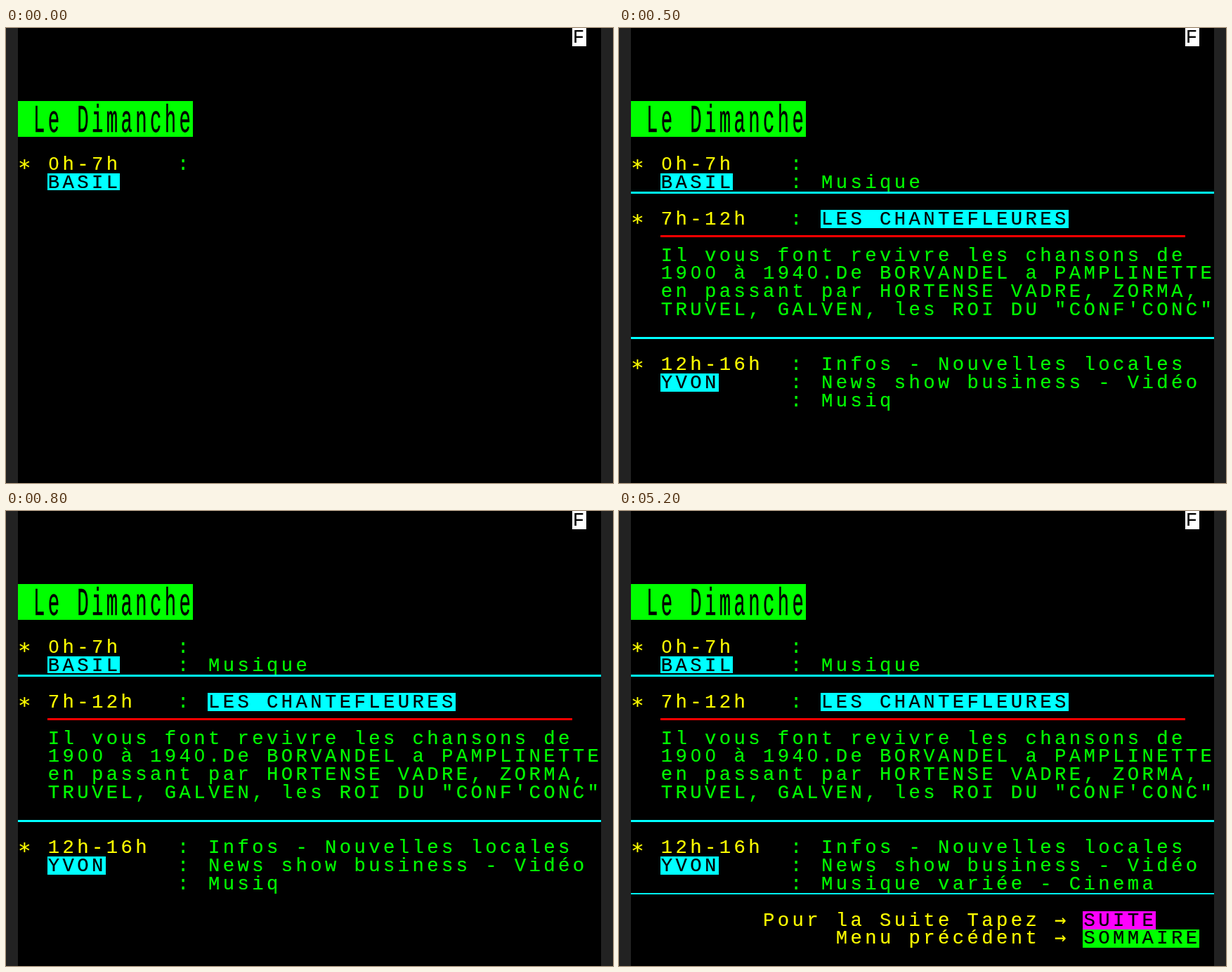
An HTML page that plays this animation: 864 px wide and 648 px high, repeating every 8000 ms.

```html
<!DOCTYPE html>
<html lang="fr">
<head>
<meta charset="utf-8">
<title>Le Dimanche</title>
<style>
  html, body { margin: 0; width: 100%; height: 100%; overflow: hidden; background: #000; }
  svg { display: block; width: 100%; height: 100%; }
  rect { shape-rendering: crispEdges; }
  text {
    font: 27.3px "Liberation Mono", "DejaVu Sans Mono", monospace;
    text-anchor: middle;
    white-space: pre;
    stroke-width: .2px;
  }
  .zero { font: 26px "Liberation Sans", Arial, sans-serif; }
  .star { font: 31px "DejaVu Sans Mono", monospace; baseline-shift: -7px; }
  .arrow { font: 27.3px "DejaVu Sans Mono", monospace; }
</style>
</head>
<body>
<svg id="screen" viewBox="0 0 864 648"></svg>
<script>
const LOOP = 8000;
const DOT = 2.59, CELL_W = 20.75, CELL_H = 10 * DOT, LEFT = 17;
const GREEN = '#0f0', YELLOW = '#ff0', CYAN = '#0ff', MAGENTA = '#f0f', RED = '#f00', WHITE = '#fff', BLACK = '#000';
const SIGNS = { '0': 'zero', '*': 'star', '→': 'arrow' };

const screen = document.getElementById('screen');
const colX = col => LEFT + col * CELL_W;
const rowY = row => row * CELL_H;

function add(parent, tag, attrs) {
  const el = document.createElementNS('http://www.w3.org/2000/svg', tag);
  for (const key in attrs) el.setAttribute(key, attrs[key]);
  parent.appendChild(el);
  return el;
}

// Edges snap to whole pixels.
function box(parent, left, top, width, height, fill) {
  const x = Math.round(left), y = Math.round(top);
  add(parent, 'rect', {
    x, y, fill,
    width: Math.round(left + width) - x,
    height: Math.round(top + height) - y
  });
}

// One glyph per cell; a few signs have their own style.
function write(parent, row, col, str, color, tall) {
  const nudge = str === ':' ? -3.5 : -1;
  const xs = [...str].map((_, i) => (colX(col + i + .5) + nudge).toFixed(2));
  const attrs = { x: xs.join(' '), fill: color, stroke: color };
  if (tall) {
    attrs.y = 0;
    attrs.transform = `translate(0 ${rowY(row) + 17 * DOT}) scale(1 2)`;
  } else {
    attrs.y = rowY(row) + 8 * DOT;
  }
  const text = add(parent, 'text', attrs);
  for (const part of str.split(/([0*→])/)) {
    if (SIGNS[part]) add(text, 'tspan', { class: SIGNS[part] }).textContent = part;
    else text.append(part);
  }
}

function label(parent, row, col, str, back, height = CELL_H) {
  box(parent, colX(col), rowY(row), str.length * CELL_W, height, back);
  write(parent, row, col, str, BLACK);
}

function rule(parent, row, color, from = 0, to = 40, drop = 0) {
  box(parent, colX(from), rowY(row) + drop, (to - from) * CELL_W, DOT, color);
}

function page1(g) {
  label(g, 0, 38, 'F', WHITE);
  box(g, colX(0), rowY(4), 12 * CELL_W, 2 * CELL_H, GREEN);
  write(g, 4, 1, 'Le Dimanche', BLACK, true);
  write(g, 7, 0, '*', YELLOW);
  write(g, 7, 2, '0h-7h', YELLOW);
  write(g, 7, 11, ':', GREEN);
  label(g, 8, 2, 'BASIL', CYAN, 9 * DOT);
}

function page2(g) {
  write(g, 8, 11, ':', GREEN);
  write(g, 8, 13, 'Musique', GREEN);
  rule(g, 9, CYAN);

  write(g, 10, 0, '*', YELLOW);
  write(g, 10, 2, '7h-12h', YELLOW);
  write(g, 10, 11, ':', GREEN);
  label(g, 10, 13, 'LES CHANTEFLEURES', CYAN);
  rule(g, 11, RED, 2, 38, 4 * DOT);
  [
    'Il vous font revivre les chansons de',
    '1900 à 1940.De BORVANDEL a PAMPLINETTE',
    'en passant par HORTENSE VADRE, ZORMA,',
    'TRUVEL, GALVEN, les ROI DU "CONF\'CONC"'
  ].forEach((line, i) => write(g, 12 + i, 2, line, GREEN));
  rule(g, 17, CYAN);

  write(g, 18, 0, '*', YELLOW);
  write(g, 18, 2, '12h-16h', YELLOW);
  label(g, 19, 2, 'YVON', CYAN);
  ['Infos - Nouvelles locales', 'News show business - Vidéo', 'Musiq'].forEach((line, i) => {
    write(g, 18 + i, 11, ':', GREEN);
    write(g, 18 + i, 13, line, GREEN);
  });
}

function page3(g) {
  write(g, 20, 18, 'ue variée - Cinema', GREEN);
  rule(g, 21, CYAN);
  write(g, 22, 9, 'Pour la Suite Tapez →', YELLOW);
  label(g, 22, 31, 'SUITE', MAGENTA);
  write(g, 23, 14, 'Menu précédent →', YELLOW);
  label(g, 23, 31, 'SOMMAIRE', GREEN);
}

box(screen, 0, 0, 864, 648, BLACK);
box(screen, 0, 0, 17, 648, '#222');
box(screen, 847, 0, 17, 648, '#222');

const steps = [[0, page1], [500, page2], [1000, page3]].map(([at, draw]) => {
  const group = add(screen, 'g', {});
  draw(group);
  return { at, group };
});

const start = performance.now();
function tick() {
  const t = (performance.now() - start) % LOOP;
  for (const { at, group } of steps) group.style.display = t >= at ? '' : 'none';
  requestAnimationFrame(tick);
}
tick();
</script>
</body>
</html>
```
